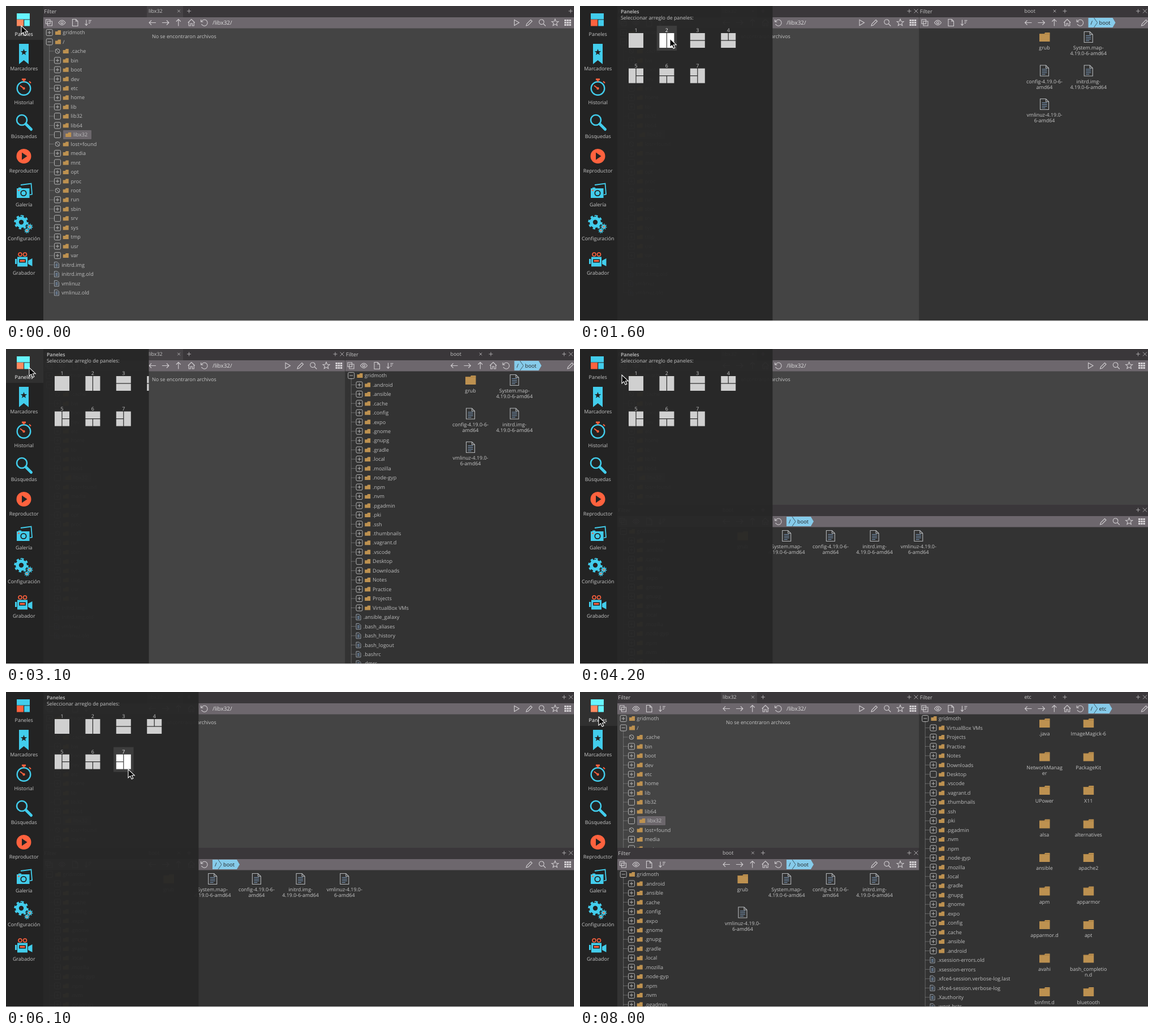
These frames come from a looping animation (1004x558 px, 9.1 s). An HTML page:

```html
<!DOCTYPE html>
<html lang="es">
<head>
<meta charset="utf-8">
<title>Paneles</title>
<style>
  html, body { margin: 0; width: 100%; height: 100%; overflow: hidden; background: #222; }
  #stage { display: block; width: 1004px; height: 558px; }
  text { font: 8.9px "Open Sans", "Noto Sans", sans-serif; fill: #c6c6c6; text-rendering: geometricPrecision; }
  .tree text { font-size: 9.1px; fill: #bdbdbd; }
  .mid { text-anchor: middle; }
  .line { fill: none; stroke: #cfcccf; stroke-width: 1.1; }
  .thin { fill: none; stroke: #b4b2b4; stroke-width: .9; }
  .solid { fill: #d6d3d6; }
  .box { fill: none; stroke: #b4b4b4; }
  .dots { fill: none; stroke: #999; stroke-dasharray: 1 1; }
  .folder { fill: #bd9150; }
  .cyan { fill: #42cdec; }
  .red { fill: #ff623e; }
  .dark { fill: #232323; }
  .ring { fill: none; stroke: #42cdec; }
  .tile { fill: #d0d0d0; }
  .glow { fill: none; }
  .on .glow { fill: #3d3d3d; }
  .on .tile { fill: #fff; }
  .on text { fill: #fff; }
  #home.on .glow { fill: #303030; }
  #home.on .cyan { fill: #66f5ff; }
  #home.on .red { fill: #ff8a60; }
</style>
</head>
<body>
<svg id="stage" viewBox="0 0 1004 558"></svg>
<script>
const LOOP = 9100, ROW = 16.46, COL = 77.7, SPLIT = 599.5;
const $ = id => document.getElementById(id);

const rect = (x, y, w, h, a = '') => `<rect x="${x}" y="${y}" width="${w}" height="${h}" ${a}/>`;
const circle = (x, y, r, a = '') => `<circle cx="${x}" cy="${y}" r="${r}" ${a}/>`;
const path = (d, a = '') => `<path d="${d}" ${a}/>`;
const text = (x, y, s, a = '') => `<text x="${x}" y="${y + 3.2}" ${a}>${s}</text>`;
const at = (x, y, s, a = '') => `<g transform="translate(${x} ${y})" ${a}>${s}</g>`;
const cls = c => `class="${c}"`;

function star(R, r) {
  const pts = [];
  for (let i = 0; i < 10; i++) {
    const a = i * Math.PI / 5, q = i % 2 ? r : R;
    pts.push((q * Math.sin(a)).toFixed(2) + ' ' + (-q * Math.cos(a)).toFixed(2));
  }
  return 'M' + pts.join('L') + 'z';
}

// Toolbar glyphs, centred on 0,0
const glyphs = {
  copy: 'M-5.5-5.5h7.5v7.5h-7.5zM-2.5-2.5h8v8h-8z',
  eye: 'M-6 0Q0-8.5 6 0Q0 8.5-6 0zM-2 0a2 2 0 1 0 4 0a2 2 0 1 0-4 0',
  file: 'M-4.5-6h6l3.5 3.5v8.5h-9.5zM1.5-6v3.5h3.5',
  sort: 'M-3-5v10M-5.5 2l2.5 3 2.5-3M1-4h5M1-1.5h4M1 1h2.5',
  back: 'M6 0H-6M-2-4l-4 4 4 4',
  next: 'M-6 0H6M2-4l4 4-4 4',
  up: 'M0 6V-6M-4-2l4-4 4 4',
  home: 'M-6 0L0-6 6 0M-4.5-1v6.5h3v-4h3v4h3V-1',
  reload: 'M-5-2A5.5 5.5 0 1 1-5 2.5M-6-5.5v4h4',
  play: 'M-4-5L4.5 0-4 5z',
  pencil: 'M-5.5 5.5l1-3.5 7-7 2.5 2.5-7 7z',
  search: 'M-5.5-1.2a4.3 4.3 0 1 0 8.6 0a4.3 4.3 0 1 0-8.6 0M2 2l4 4',
  star: star(6.3, 2.8),
  plus: 'M-3.5 0h7M0-3.5v7',
  cross: 'M-2.3-2.3l4.6 4.6M2.3-2.3l-4.6 4.6',
  wide: 'M-3.5-3.5l7 7M3.5-3.5l-7 7'
};
const glyph = (name, x) => at(x, 29.5, path(glyphs[name], cls('line')));
const mark = (name, x) => at(x, 9, path(glyphs[name], cls('thin')));

function gridGlyph(x) {
  let s = '';
  for (let i = 0; i < 9; i++) s += rect(-6 + i % 3 * 4.2, -5.5 + (i / 3 | 0) * 4, 3.4, 3, cls('solid'));
  return at(x, 29.5, s);
}

const smallFolder = (x, y) => at(x, y, path('M-5-2h4l1-2h5v8h-10z', cls('folder')));
const bigFolder = (x, y) => at(x, y, path('M-9-5.5h8.5l1.5-2.5h8.5v16h-18.5z', cls('folder')) + path('M-9-5.5h18.5', 'stroke="#a87f42"'));
const smallFile = (x, y) => at(x, y, path('M-4-5h5l3 3v7h-8z', 'fill="none" stroke="#9aa3ad"') + path('M-2-1.5h4M-2 .5h4M-2 2.5h4', 'stroke="#7f9fc4"'));
const bigFile = (x, y) => at(x, y, path('M-7.5-9.5h10l5 5v14h-15zM2.5-9.5v5h5', 'fill="none" stroke="#b4b7ba" stroke-width="1.1"') + path('M-4.5-2.5h9M-4.5 .5h9M-4.5 3.5h9M-4.5 6.5h6', 'stroke="#7e9dc0" stroke-width="1.1"'));

function toggle(x, y, kind) {
  if (kind === 'x') return circle(x, y, 4, cls('box')) + path(`M${x - 3} ${y - 3}l6 6`, cls('box'));
  let d = '';
  if (kind !== 'o') d = `M${x - 3} ${y}h6`;
  if ('+P'.includes(kind)) d += `M${x} ${y - 3}v6`;
  return rect(x - 5.5, y - 5.5, 11, 11, 'rx="2" class="box"') + path(d, cls('box'));
}

// Row kinds: P/M closed or open root, + branch, o empty, x locked, f file, s selected
function tree(rows) {
  let s = '', top = 0, y = 47;
  rows.forEach((row, i) => {
    const kind = row[0], name = row.slice(1);
    y = 47 + i * ROW;
    if (kind === 'M') top = y + 6;
    if ('PM'.includes(kind)) {
      s += toggle(10.7, y, kind) + smallFolder(26, y) + text(34.3, y, name);
      return;
    }
    s += path(`M11 ${y}h8`, cls('dots'));
    if (kind === 'f') { s += smallFile(23.5, y) + text(32.3, y, name); return; }
    const sel = kind === 's' ? 4.5 : 0;
    if (sel) s += rect(35, y - 8, 50, 16, 'rx="1" fill="#6c676c"');
    s += toggle(25, y, sel ? 'o' : kind) + smallFolder(39.7 + sel, y) + text(48.5 + sel, y, name);
  });
  return `<g class="tree">${path(`M10.7 ${top}V${y}`, cls('dots'))}${s}</g>`;
}

function files(list, w) {
  const cols = Math.floor((w - 180) / COL);
  return list.map((item, i) => {
    const dir = item[0] === '/', lines = item.replace('/', '').split('|');
    const x = 221.5 + i % cols * COL, y = 55 + (i / cols | 0) * 59.5;
    return (dir ? bigFolder : bigFile)(x, y) + lines.map((t, k) => text(x, y + 19 + k * 10, t, cls('mid'))).join('');
  }).join('');
}

function crumb(x, name) {
  const w = name === 'boot' ? 43 : 37;
  return at(x, 29.5, path(`M0-8.5H${w}l5 8.5-5 8.5H0z`, 'fill="#86cbea"') +
    path('M10-8.5l6 8.5-6 8.5', 'fill="none" stroke="#3d5a68"') +
    text(4, 0, '/', 'style="fill:#222;font-size:9.5px"') + text(19, 0, name, 'style="fill:#222;font-size:9.2px"'));
}

function panel({ x = 66, y = 0, w, h, tab, only, body }) {
  const live = tab === 'libx32', edge = w < 450;
  let s = rect(0, 0, w, h, `fill="${live ? '#444' : '#333'}"`) + rect(0, 0, w, 20, 'fill="#3a373a"');
  if (live) s += rect(183, 0, 64, 20, 'fill="#464346"');
  s += rect(0, 20, w, 19.5, 'fill="#6d676d"');
  s += text(1.3, 9.5, 'Filter', 'style="font-size:9.4px"') + text(186, 9, tab);
  s += mark('cross', 239.5) + mark('plus', 257.5);
  s += only ? mark('plus', w - 6) : mark('plus', w - 17.5) + mark('wide', w - 5.5);
  ['copy', 'eye', 'file', 'sort'].forEach((n, i) => s += glyph(n, 10 + i * 23));
  ['back', 'next', 'up', 'home', 'reload'].forEach((n, i) => s += glyph(n, 193 + i * 22.9));
  s += live ? text(299, 29.5, '/libx32/', 'style="font-size:9.9px;fill:#ddd"') : crumb(299, tab);
  if (edge) s += glyph('pencil', 398.5);
  else {
    if (live) s += glyph('play', w - 101.5);
    ['pencil', 'search', 'star'].forEach((n, i) => s += glyph(n, w - 79 + i * 22.8));
    s += gridGlyph(w - 11);
  }
  return `<svg x="${x}" y="${y}" width="${w}" height="${h}">${s}${body}</svg>`;
}

const USER = 'gridmoth';
const rootRows = `P${USER},M/,x.cache,+bin,+boot,+dev,+etc,+home,+lib,olib32,+lib64,slibx32,xlost+found,+media,omnt,+opt,+proc,xroot,+run,+sbin,osrv,+sys,+tmp,+usr,+var,finitrd.img,finitrd.img.old,fvmlinuz,fvmlinuz.old`.split(',');
const dirs = '+.android,+.ansible,+.cache,+.config,+.expo,+.gnome,+.gnupg,+.gradle,+.local,+.mozilla,+.node-gyp,+.npm,+.nvm,+.pgadmin,+.pki,+.ssh,+.thumbnails,+.vagrant.d,+.vscode,oDesktop,+Downloads,+Notes,+Practice,+Projects,+VirtualBox VMs'.split(',');
const homeRows = ['M' + USER, ...dirs, ...'f.ansible_galaxy,f.bash_aliases,f.bash_history,f.bash_logout,f.bashrc,f.dmrc'.split(',')];
const backRows = ['M' + USER, ...dirs.slice().reverse(), ...'f.xsession-errors.old,f.xsession-errors,f.xfce4-session.verbose-log.last,f.xfce4-session.verbose-log,f.Xauthority,f.wget-hsts'.split(',')];
const bootFiles = ['/grub', 'System.map-|4.19.0-6-amd64', 'config-4.19.0-6-|amd64', 'initrd.img-|4.19.0-6-amd64', 'vmlinuz-4.19.0-|6-amd64'];
const etcFiles = '/.java,/ImageMagick-6,/NetworkManag|er,/PackageKit,/UPower,/X11,/alsa,/alternatives,/ansible,/apache2,/apm,/apparmor,/apparmor.d,/apt,/avahi,/bash_completio|n.d,/binfmt.d,/bluetooth'.split(',');

const emptyBody = tree(rootRows) + text(192, 53.5, 'No se encontraron archivos');
const HALF = SPLIT - 66, SIDE = 1004 - SPLIT;
const lib = (w, h, only) => panel({ w, h, only, tab: 'libx32', body: emptyBody });
const boot = w => panel({ y: 276, w, h: 281, tab: 'boot', body: tree(homeRows) + files(bootFiles, w) });
const side = (tab, body) => panel({ x: SPLIT, w: SIDE, h: 557, tab, body });

const layouts = [
  lib(938, 557, true),
  lib(HALF, 557) + side('boot', `<g id="bootTree">${tree(homeRows)}</g>` + files(bootFiles, SIDE)),
  lib(938, 276) + boot(938),
  lib(HALF, 276) + boot(HALF) + side('etc', `<g id="etcTree">${tree(backRows)}</g><g id="etcFiles">${files(etcFiles, SIDE)}</g>`)
];

const gear = (x, y, r, hole) => circle(x, y, r, cls('cyan')) +
  circle(x, y, r + 1, `class="ring" stroke-width="${r / 3}" pathLength="16" stroke-dasharray="1 1"`) + circle(x, y, r * .42, cls(hole));
const reel = x => circle(x, 440, 3, 'fill="none" stroke="#ff623e" stroke-width="1.6"');

const icons = [
  rect(19, 13, 23, 10.5, cls('cyan')) + rect(19, 24, 12, 11.5, cls('red')) + rect(32.2, 24.5, 9.8, 11, cls('cyan')),
  path('M23 67h17v36l-8.5-7-8.5 7z', cls('cyan')) + at(31.5, 82, path(star(6, 2.5), cls('dark'))),
  circle(31.5, 146, 11.8, 'class="ring" stroke-width="2.4"') + rect(28, 128.5, 7, 3, cls('red')) + rect(30.3, 131, 2.5, 3, cls('red')) +
    path('M41 133.5l3 3', 'stroke="#ff623e" stroke-width="2"') + path('M31.5 146l-6.5-5', 'stroke="#ff623e" stroke-width="2"') + circle(31.5, 146, 2.2, cls('red')),
  circle(28, 202, 9, 'class="ring" stroke-width="2.6"') + path('M35 209l9.5 9.5', 'class="ring" stroke-width="5" stroke-linecap="round"'),
  circle(31.5, 266, 13, cls('red')) + path('M28 259.5l9.5 6.5-9.5 6.5z', cls('dark')),
  path('M26 317l18.5-2.5 1.5 19-4 1', 'class="ring" stroke-width="1.8"') + path('M19 323h3v-1.5h5v1.5h14.5v17h-22.5z', cls('cyan')) +
    circle(31, 331.5, 5.6, cls('dark')) + circle(31, 331.5, 3.8, cls('cyan')) + rect(21, 325.5, 3, 2, cls('red')),
  gear(27, 383, 10, 'dark') + gear(42, 391, 3.8, 'red') + gear(37, 398, 3.2, 'red'),
  reel(25) + reel(33.5) + rect(20, 444.5, 18, 17, cls('cyan')) + path('M39 451l7.5-4v14l-7.5-4zM16 448h3.2v9h-3.2z', cls('cyan')) +
    rect(23, 448.5, 12, 6, cls('dark')) + rect(24.5, 450, 9, 3, cls('red'))
];
const names = ['Paneles', 'Marcadores', 'Historial', 'Búsquedas', 'Reproductor', 'Galería', 'Configuración', 'Grabador'];
const sidebar = rect(0, 0, 66, 557, cls('dark')) + names.map((n, i) =>
  `<g ${i ? '' : 'id="home"'}>${rect(0, 0, 66, i ? 0 : 60, cls('glow'))}${icons[i]}${text(31.7, 50 + i * 60.35, n, cls('mid'))}</g>`).join('');

// Tiles of each arrangement as x, y, w, h in halves of a square
const splits = ['0022', '0012 1012', '0021 0121', '0011 1011 0121', '0012 1011 1111', '0021 0111 1111', '0011 0111 1012'];
const choices = splits.map((set, i) => ({ set, x: 99 + i % 4 * 54.4, y: 35 + (i / 4 | 0) * 62.6 }));
const choice = ({ set, x, y }, i) => {
  const tiles = set.split(' ').map(t => {
    const [a, b, w, h] = [...t].map(Number);
    return rect(a * 13.6 - 13, b * 13.6 + 13, w * 13.6 - 1.2, h * 13.6 - 1.2, cls('tile'));
  }).join('');
  return at(x, y, rect(-17.7, 0, 35.5, 44, cls('glow')) + tiles + text(0, 7.8, i + 1, cls('mid')), `id="pick${i}"`);
};
const menu = `<svg id="menu" x="66" y="0" width="0" height="557">${at(-66, 0,
  rect(66, 0, 276, 557, 'fill="#272727" fill-opacity=".96"') +
  text(72, 10, 'Paneles', 'style="font-weight:600;font-size:8.7px"') +
  text(72, 20.5, 'Seleccionar arreglo de paneles:') + choices.map(choice).join(''))}</svg>`;

$('stage').innerHTML = rect(0, 0, 1004, 558, 'fill="#333"') +
  layouts.map((s, i) => `<g id="layout${i}">${s}</g>`).join('') + menu + sidebar +
  rect(0, 557, 1004, 1, 'fill="#ccc"') +
  `<g id="cursor">${path('M0 0V15l3.6-3.3 2.6 5.6 2.6-1.2-2.5-5.4h4.9z', 'fill="#000" stroke="#fff" stroke-width="1.1"')}</g>`;

// time, value: each holds until the next
const layoutAt = [[0, 0], [1600, 1], [4200, 2], [6500, 3]];
const OPEN = 340.4;
const edgeAt = [[0, 66], [700, 252.5], [800, 336.5], [900, OPEN], [2400, 259], [2900, 66], [3100, 252.5], [3200, 336.5], [3400, OPEN],
  [4800, 129], [5000, 66], [5400, 275.5], [5600, OPEN], [7900, 150], [8000, 66]];
// time, x, y: moves in a straight line between stops
const route = [[0, 27, 35], [600, 27, 35], [800, 42, 38], [1300, 159, 58], [1600, 159, 58], [2200, 41, 33], [3100, 41, 33],
  [3200, 46, 35], [3300, 46, 35], [3600, 207, 60], [4100, 207, 60], [4200, 74, 46], [4500, 31, 36], [5500, 31, 36],
  [6100, 216, 137], [7000, 216, 137], [7200, 53, 58], [7400, 53, 58], [7600, 33, 44], [LOOP, 33, 44]];

const hold = (list, t) => list.filter(e => e[0] <= t).pop()[1];
function along(t) {
  const i = route.findIndex(p => p[0] > t), [t0, x0, y0] = route[i - 1], [t1, x1, y1] = route[i];
  const k = (t - t0) / (t1 - t0);
  return [x0 + (x1 - x0) * k, y0 + (y1 - y0) * k];
}
const show = (id, on) => $(id).style.display = on ? '' : 'none';

let last = -1;
function draw(now) {
  const t = Math.floor(now % LOOP / 100) * 100;
  if (t !== last) {
    last = t;
    const current = hold(layoutAt, t), edge = hold(edgeAt, t), [x, y] = along(t);
    layouts.forEach((_, i) => show('layout' + i, i === current));
    show('bootTree', t >= 1700);
    show('etcFiles', t >= 7100);
    show('etcTree', t >= 7500);
    $('menu').setAttribute('width', edge - 66);
    $('home').classList.toggle('on', x < 50 && y < 60);
    choices.forEach((c, i) => $('pick' + i).classList.toggle('on',
      edge === OPEN && Math.abs(x - c.x) < 17.7 && y > c.y && y < c.y + 44));
    $('cursor').setAttribute('transform', `translate(${x} ${y})`);
  }
  requestAnimationFrame(() => draw(performance.now() - start));
}
const start = performance.now();
draw(0);
</script>
</body>
</html>
```
